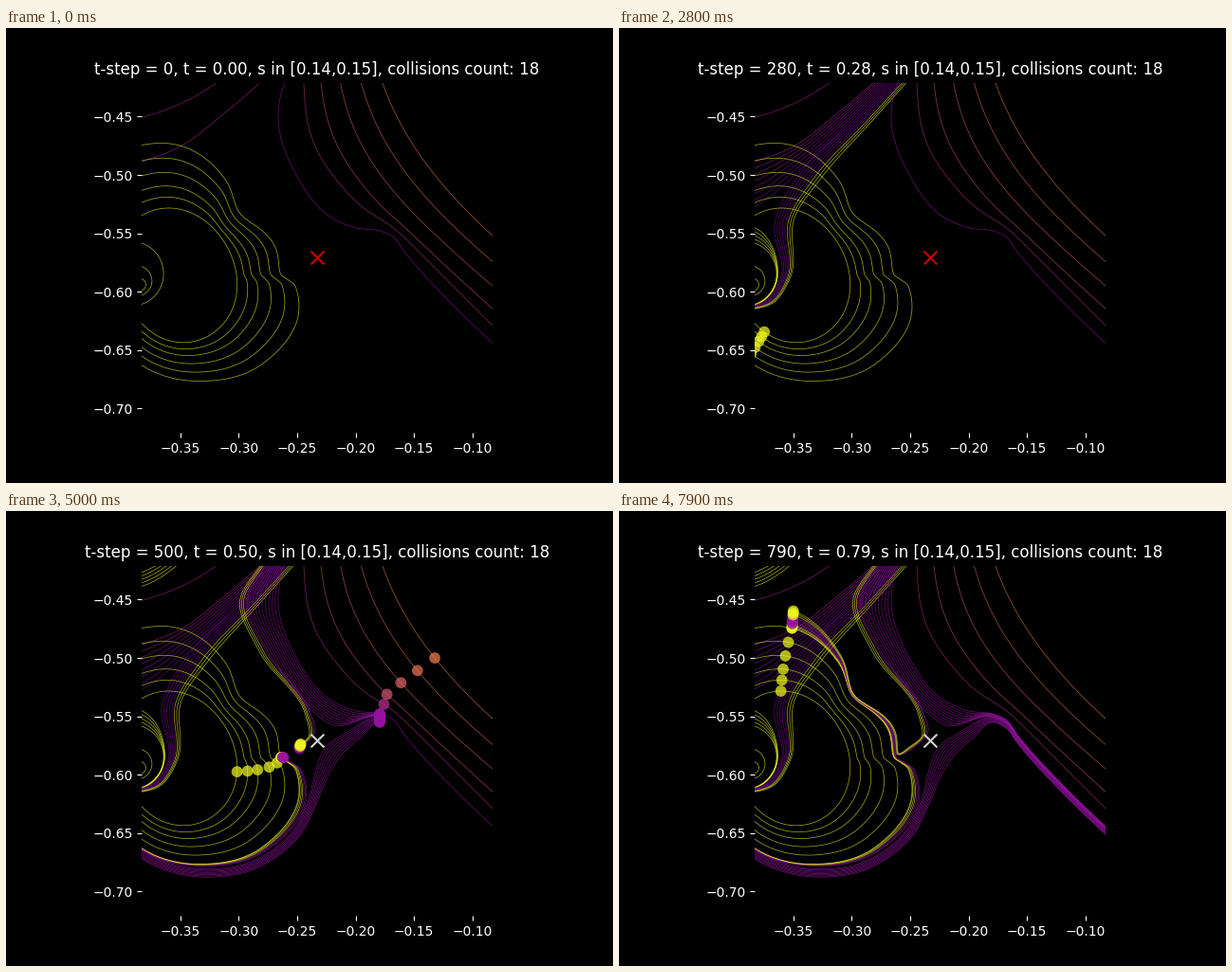
A matplotlib script that plays this animation: 640 by 480 pixels, repeating every 8 s.

```python
import numpy as np
import matplotlib.pyplot as plt
from matplotlib.animation import FuncAnimation
from matplotlib.collections import LineCollection

FRAMES, INTERVAL = 80, 100
SCALE = 1232                      # pixels per data unit
CX, CY = -0.23295, -0.5709        # view centre, also the collision point
HALF = 0.15
T_HIT = 0.47                      # time of the collision
YELLOW, PURPLE = 1.0, 0.32
SAMPLES = 12

rays = []                         # (times, points, colour, grows)


def lerp(a, b, u):
    return (1 - u) * np.array(a, float) + u * np.array(b, float)


def spline(p):
    """Smooth curve through p; knot i lands on sample i * SAMPLES."""
    s = np.r_[0, np.cumsum(np.hypot(*np.diff(p, axis=0).T))]
    m = np.gradient(p, s, axis=0)
    h = np.linspace(0, 1, SAMPLES, endpoint=False)[:, None]
    d = np.diff(s)[:, None, None]
    a, b, ma, mb = p[:-1, None], p[1:, None], m[:-1, None] * d, m[1:, None] * d
    q = ((2*h**3 - 3*h**2 + 1) * a + (h**3 - 2*h**2 + h) * ma
         + (3*h**2 - 2*h**3) * b + (h**3 - h**2) * mb)
    return np.vstack([q.reshape(-1, 2), p[-1:]])


def ray(pts, times, tone, grows=True):
    """Add a path in pixels; times maps knots to moments, the rest follows arc length."""
    q = spline(np.array(pts, float))
    arc = np.r_[0, np.cumsum(np.hypot(*np.diff(q, axis=0).T))]
    knots = [k % len(pts) for k in times]
    ts = np.interp(arc, arc[np.array(knots) * SAMPLES], list(times.values()))
    data = np.c_[CX + (q[:, 0] - 328) / SCALE, CY - (q[:, 1] - 242.4) / SCALE]
    rays.append((ts, data, plt.cm.plasma(tone), grows))


# ---- big loops: polar curves with two notches in the outer rim
RIM = spline(np.array([(-112, 140), (-90, 138), (-60, 116), (-42, 98), (-13, 115), (-1, 116),
                       (5, 132), (18, 142), (43, 136), (74, 117), (112, 98)], float))


def loop(deg, u, extra=0):
    th = np.radians(deg)
    core = 70 + 5 * np.sin(2 * th) + 8 * np.cos(th) * (1 - np.cos(th))
    gap = np.interp(deg, *RIM.T) - core
    r = core + gap * min(u, 1) + max(u - 1, 0) * gap**3 / 4500 + extra
    return np.c_[173 + r * np.cos(th), 260 + r * np.sin(th)]


def clock(deg, u):
    """Moment at which a loop passes the given angles."""
    u = min(u, 1)
    return np.interp(deg, [-125, -92 + 6 * u, -41, 12 * (1 - u), 43, 108, 125],
                     [.9, .79, .65, .5, .42, .28 + .012 * u, .25])


def loop_ray(u, tone, grows):
    deg = np.arange(125, -126, -2.5)
    ray(loop(deg, u), dict(enumerate(clock(deg, u))), tone, grows)


def outlet(v):
    """Shared way out to the lower right."""
    return np.array([(394, 214), (408, 220), (420, 236), (468, 289), (525, 344)]) + [0, 9 * v]


# small loops at the left edge
for k, r in enumerate([6.5, 16, 34, 34.5, 35, 35.5, 36]):
    a = np.radians(np.arange(120, -130, -10))
    stretch = np.where(a < 0, 1 + .1 * max(k - 2, 0), 1)
    ray(np.c_[143 - .32 * r + r * np.cos(a), 273.5 - .42 * r + r * stretch * np.sin(a)],
        {0: .06, -1: .155}, YELLOW, k > 2)

# first wave, leaving through the top
ray([(128, 55), (151, 54), (175, 45)], {0: .135, 1: .16, 2: .19}, .66, False)
ray([(120, 100), (161, 89), (192, 76), (245, 42)], {0: .125, 1: .16, 3: .225}, .38, False)
for u in np.linspace(0, 1, 8):
    ray(lerp([(120, 148), (143, 141), (180, 127), (235, 86), (290, 38)],
             [(120, 196), (143, 188), (194, 147), (246, 97), (304, 38)], u),
        {0: .09, 2: .16, 4: .27}, .38 - .12 * u, u > 0)
for u in np.linspace(0, 1, 8):
    ray(lerp([(120, 297), (158, 285), (171, 262), (164, 208), (195, 148), (248, 98), (306, 38)],
             [(120, 300), (165, 288), (181, 262), (185, 200), (211, 161), (265, 100), (321, 38)], u),
        {0: .045, 4: .16, 6: .265}, YELLOW if u > .7 else .27)

# arcs in the top left corner
for u in np.linspace(0, 1, 5):
    ray(lerp([(120, 73), (146, 63.5), (185, 42)], [(120, 86), (151, 76.5), (200, 42)], u),
        {0: .395, 1: .42, 2: .47}, YELLOW)

# big loops: fixed ones, then those that grow past the rim
for u in [0, .17, .34, .55, .77, 1]:
    loop_ray(u, YELLOW, False)
for u in np.linspace(1.01, 1.12, 6):
    loop_ray(u, YELLOW if u < 1.06 else PURPLE, True)

# along the rim from the bottom, then turning right
deg = np.array([115, 100, 85, 70, 56, 43, 30, 18])
for u in np.linspace(0, 1, 8):
    turn = lerp([(327, 273), (335, 252), (360, 233)], [(341, 277), (355, 256), (374, 239)], u)
    pts = np.vstack([loop(deg, 1, 3 + 9 * u + 8 * np.cos(np.radians(deg))), turn, outlet(.45 + .55 * u)])
    times = dict(enumerate(clock(deg[:6], 1)))
    ray(pts, {**times, -5: .5, -1: .69}, PURPLE)

# from the top, turning left to the rim
deg = np.arange(-2, -111, -3)
for u in [1, .8, .5, .25, 0]:
    fall = lerp([(285, 38), (265, 62), (247, 92), (267, 148), (316, 216), (319, 238), (306, 249)],
                [(289, 40), (270, 64), (255, 92), (276, 148), (321, 213), (326, 232), (314, 247)], u)
    rim = 1.28 - .12 * u
    times = {len(fall) + k: t for k, t in enumerate(clock(deg, 1))}
    ray(np.vstack([fall, loop(deg, rim)]), {0: .395, 1: .42, **times}, YELLOW if u < .7 else PURPLE)

# from the top, turning right
for u in np.linspace(0, 1, 10):
    fall = lerp([(290, 40), (272, 66), (257, 92), (278, 146), (320, 208), (345, 226)],
                [(303, 38), (289, 74), (287, 95), (305, 153), (343, 200), (370, 211)], u)
    ray(np.vstack([fall, outlet(.4 * (1 - u))]), {0: .395, 1: .42, 6: .5, -1: .69}, PURPLE, u < 1)

# fan on the right: each ray bends from steep to diagonal
for u in np.linspace(0, 1, 5) ** 1.1:
    y = np.arange(38, 342, 8)
    slope, mid, width = lerp([1, 130, 22], [1.5, 145, 75], u)
    bend = slope * width * np.log1p(np.exp((np.r_[58, y] - mid) / width))
    x = 314 + 83 * u + bend[1:] - bend[0] + 8 * (1 - u)**6 * (1 + np.tanh((y - 200) / 12))
    t = .42 + .08 * (y - 78 + 14 * u**2) / (126 - 49 * u + 14 * u**2)
    ray(np.c_[x, y], dict(enumerate(t)), .42 + .26 * np.sqrt(u), False)

# ---- stage
plt.style.use("dark_background")
fig, ax = plt.subplots(figsize=(6.4, 4.8), dpi=100)
ax.set_aspect("equal")
ax.set_xlim(CX - HALF, CX + HALF)
ax.set_ylim(CY - HALF, CY + HALF)
for side in ax.spines.values():
    side.set_visible(False)
title = ax.set_title("")

colors = [r[2] for r in rays]
trails = ax.add_collection(LineCollection([], colors=colors, linewidths=.5, alpha=.7), autolim=False)
dots = ax.scatter(np.zeros(len(rays)), np.zeros(len(rays)), s=72, c=colors, alpha=.72, linewidths=0, zorder=3)
cross = ax.scatter([CX], [CY], s=100, marker="x", linewidths=1.5, zorder=4)


def position(ts, pts, t):
    if not ts[0] <= t <= ts[-1]:
        return np.full(2, np.nan)
    return np.array([np.interp(t, ts, col) for col in pts.T])


def draw(frame):
    step = frame * 10
    t = step / 1000
    title.set_text(f"t-step = {step}, t = {t:.2f}, s in [0.14,0.15], collisions count: 18")
    heads = np.array([position(ts, pts, t) for ts, pts, _, _ in rays])
    segs = []
    for (ts, pts, _, grows), head in zip(rays, heads):
        if grows:
            pts = pts[ts <= t]
            if len(pts) and not np.isnan(head[0]):
                pts = np.vstack([pts, head])
        segs.append(pts if len(pts) else np.full((2, 2), np.nan))
    trails.set_segments(segs)
    dots.set_offsets(heads)
    cross.set_color((.82, .82, .82) if t >= T_HIT else (.8, 0, 0))
    return trails, dots, cross, title


anim = FuncAnimation(fig, draw, frames=FRAMES, interval=INTERVAL, init_func=lambda: draw(0), repeat=True)
plt.show()
```
